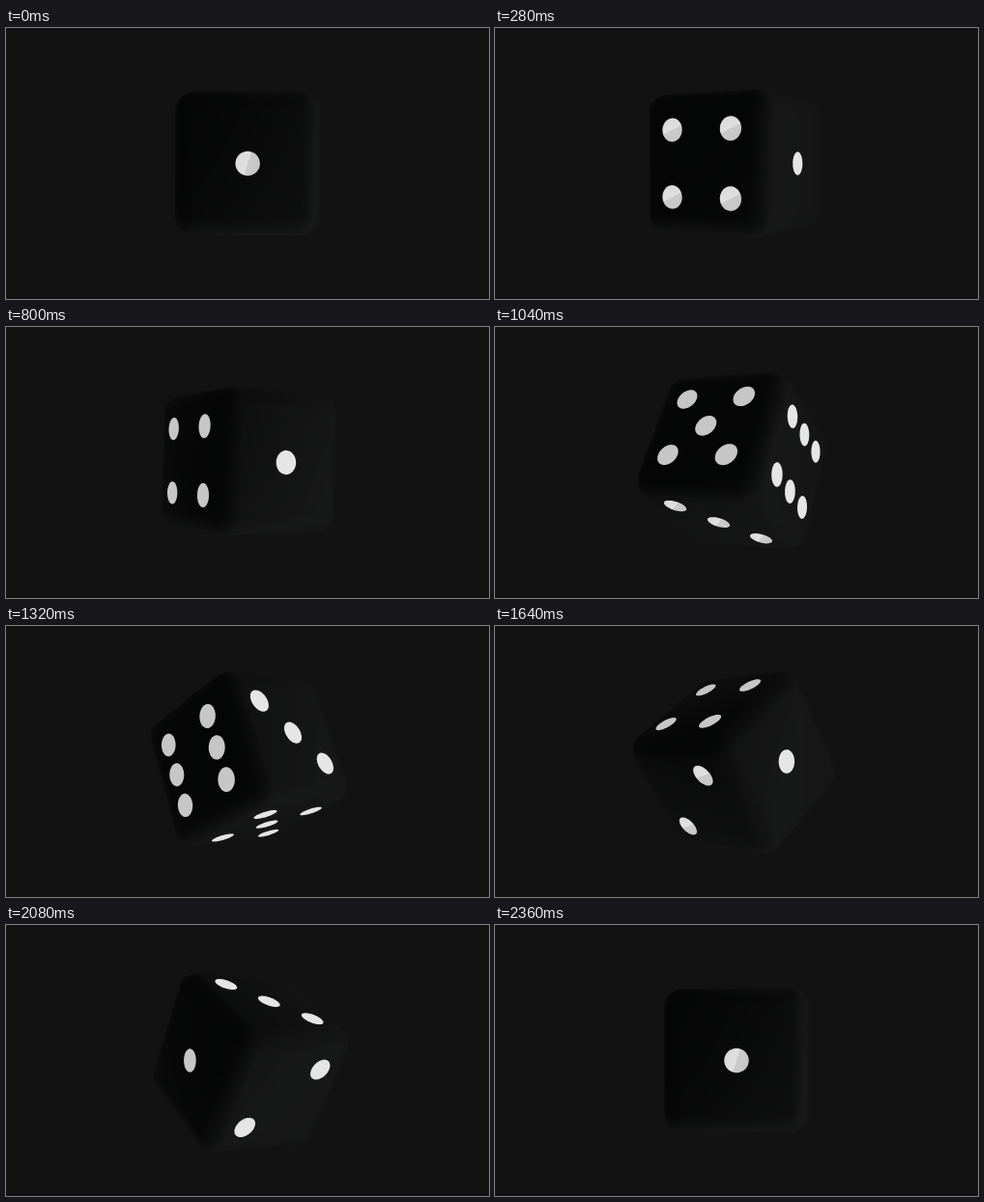
These frames come from a looping animation (500 by 281 pixels, 2400 ms). An HTML page with a canvas:

```html
<!DOCTYPE html>
<html lang="en">
<head>
<meta charset="utf-8">
<title>Rolling die</title>
<style>
  html, body { margin: 0; width: 100%; height: 100%; overflow: hidden; background: #121212; }
  canvas { display: block; }
</style>
</head>
<body>
<canvas id="stage" width="500" height="281"></canvas>
<script>
const LOOP = 2400;
const CX = 250, CY = 140.5;          // projection centre
const FOCAL = 746, DIST = 10.75;     // camera, in half-edges of the die
const ROUND = 0.27, INNER = 1 - ROUND;
const BEND = 0.35;                   // how far shading normals lean outwards
const STEP = 0.472, PIP = 0.166;     // pip spacing and radius
const SIZE = 220, LEFT = 140, TOP = 30;

const ctx = document.getElementById('stage').getContext('2d');
const body = document.createElement('canvas');
body.width = body.height = SIZE;
const bodyCtx = body.getContext('2d');
const image = bodyCtx.createImageData(SIZE, SIZE);

// Each face: normal, two tangents, pips in tangent units
const corners = [[-1, -1], [1, -1], [-1, 1], [1, 1]];
const faces = [
  { n: [0, 0, 1],  u: [1, 0, 0], v: [0, 1, 0], pips: [[0, 0]] },
  { n: [0, -1, 0], u: [1, 0, 0], v: [0, 0, 1], pips: [[-1, 1], [1, -1]] },
  { n: [1, 0, 0],  u: [0, 1, 0], v: [0, 0, 1], pips: [[-1, -1], [0, 0], [1, 1]] },
  { n: [-1, 0, 0], u: [0, 1, 0], v: [0, 0, 1], pips: corners },
  { n: [0, 1, 0],  u: [1, 0, 0], v: [0, 0, 1], pips: [...corners, [0, 0]] },
  { n: [0, 0, -1], u: [1, 0, 0], v: [0, 1, 0], pips: [...corners, [-1, 0], [1, 0]] },
];

const clamp01 = x => Math.min(1, Math.max(0, x));
const smooth = (a, b, x) => {
  const k = clamp01((x - a) / (b - a));
  return k * k * (3 - 2 * k);
};
const gray = v => `rgb(${v},${v},${v})`;

// The die rolls about its 1-6 axis, then that axis turns about the vertical
function pose(t) {
  const yaw = smooth(-12, 2358, t) * 8 * Math.PI;
  const roll = smooth(759, 2360, t) * 4 * Math.PI;
  const cy = Math.cos(yaw), sy = Math.sin(yaw), cr = Math.cos(roll), sr = Math.sin(roll);
  return {
    toWorld([x, y, z]) {
      const h = x * cr + y * sr;
      return [h * cy + z * sy, y * cr - x * sr, z * cy - h * sy];
    },
    toLocal(x, y, z) {
      const h = x * cy - z * sy;
      return [h * cr - y * sr, h * sr + y * cr, x * sy + z * cy];
    },
  };
}

// Darkest towards the upper left, fading into the backdrop at grazing angles
function tone([x, y, z]) {
  const len = Math.hypot(x, y, z);
  const dark = (0.65 * (z - x) + 0.35 * y) / len;
  const lit = 4 + 20 * clamp01((0.9 - dark) / 0.9);
  const graze = (1 - Math.max(0, z / len)) ** 2;
  return lit + (17 - lit) * graze;
}

// Ray-march a rounded cube
function drawBody({ toWorld, toLocal }) {
  const data = image.data;
  const [ox, oy, oz] = toLocal(0, 0, DIST);
  for (let j = 0, k = 0; j < SIZE; j++) {
    for (let i = 0; i < SIZE; i++, k += 4) {
      const sx = (LEFT + i + 0.5 - CX) / FOCAL, sy = (CY - TOP - j - 0.5) / FOCAL;
      const [dx, dy, dz] = toLocal(sx, sy, -1);
      data[k + 3] = 0;
      for (let t = DIST - 1.6, n = 0; n < 40 && t < DIST + 1.6; n++) {
        const x = ox + dx * t, y = oy + dy * t, z = oz + dz * t;
        const qx = Math.max(Math.abs(x) - INNER, 0);
        const qy = Math.max(Math.abs(y) - INNER, 0);
        const qz = Math.max(Math.abs(z) - INNER, 0);
        const len = Math.sqrt(qx * qx + qy * qy + qz * qz), gap = len - ROUND;
        if (gap < 0.004) {
          const lean = (p, q) => Math.sign(p) * q / len + BEND * p;
          const v = tone(toWorld([lean(x, qx), lean(y, qy), lean(z, qz)]));
          data[k] = v;
          data[k + 1] = data[k + 2] = v + 0.4;
          data[k + 3] = 255;
          break;
        }
        t += gap * 0.98;
      }
    }
  }
  bodyCtx.putImageData(image, 0, 0);
  ctx.drawImage(body, LEFT, TOP);
}

function project([x, y, z]) {
  const k = FOCAL / (DIST - z);
  return [CX + x * k, CY - y * k];
}

function pipFill([nx, ny, nz], [x, y]) {
  if (nx > 0.2 || nz - 0.5 * ny < 0.82) return gray(198 + 31 * smooth(0.1, 0.3, nx));
  // A reflected edge splits pips that face the viewer
  const a = 0.3 - nx * 1.6, c = Math.cos(a) * 13, s = Math.sin(a) * 13;
  const fill = ctx.createLinearGradient(x - c, y - s, x + c, y + s);
  fill.addColorStop(0, gray(218));
  fill.addColorStop(0.48, gray(224));
  fill.addColorStop(0.52, gray(202));
  fill.addColorStop(1, gray(198));
  return fill;
}

function drawPips({ toWorld }) {
  for (const { n, u, v, pips } of faces) {
    const normal = toWorld(n);
    if (normal[2] * DIST <= 1) continue;
    const at = (a, b) => project(toWorld(n.map((c, i) => c + u[i] * a + v[i] * b)));
    for (const [a, b] of pips) {
      ctx.beginPath();
      for (let i = 0; i < 40; i++) {
        const w = i * Math.PI / 20;
        ctx.lineTo(...at(a * STEP + PIP * Math.cos(w), b * STEP + PIP * Math.sin(w)));
      }
      ctx.fillStyle = pipFill(normal, at(a * STEP, b * STEP));
      ctx.fill();
    }
  }
}

function draw(now) {
  const die = pose(now % LOOP);
  ctx.fillStyle = '#121212';
  ctx.fillRect(0, 0, 500, 281);
  drawBody(die);
  drawPips(die);
  requestAnimationFrame(draw);
}
requestAnimationFrame(draw);
</script>
</body>
</html>
```
